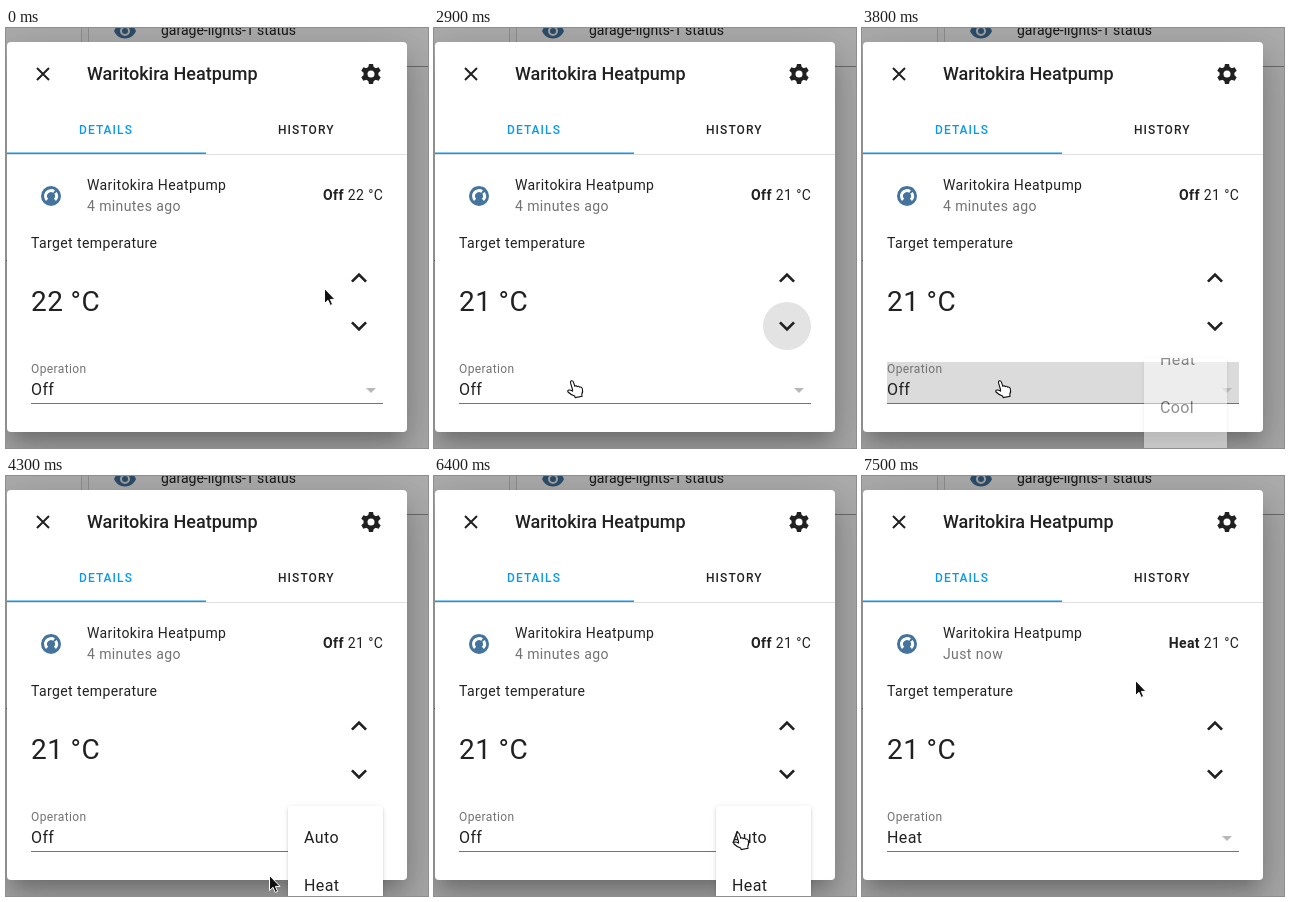
An HTML page for the animation above (8000 ms loop, 422 by 420 pixels).

```html
<!DOCTYPE html>
<html lang="en">
<head>
<meta charset="utf-8">
<title>Heatpump control</title>
<style>
  html, body { margin: 0; width: 100%; height: 100%; overflow: hidden; }
  body { position: relative; background: #aaa; font: 14px Roboto, sans-serif; letter-spacing: .4px; }
  svg, #dialog, #menu { position: absolute; }
  svg { left: 0; top: 0; width: 422px; height: 420px; fill: #212121; }
  #dialog {
    left: 1px; top: 14px; width: 400px; height: 390px; border-radius: 4px; background: #fff;
    box-shadow: 0 11px 15px -7px rgba(0,0,0,.2), 0 24px 38px 3px rgba(0,0,0,.14), 0 9px 46px 8px rgba(0,0,0,.12);
  }
  #menu {
    left: 282px; top: 330px; width: 95px; height: 208px; overflow: hidden; border-radius: 2px; background: #fff;
    box-shadow: 0 2px 2px rgba(0,0,0,.14), 0 1px 5px rgba(0,0,0,.12), 0 3px 1px -2px rgba(0,0,0,.2);
  }
  #items { padding: 8px 16px; font-size: 16px; line-height: 48px; color: #212121; }
  .plain { letter-spacing: 0; }
  .title { font-size: 18px; font-weight: 500; letter-spacing: 0; }
  .tab { font-size: 12px; font-weight: 500; letter-spacing: .0893em; }
  .muted { fill: #727272; }
  .label { font-size: 12px; }
  .value { font-size: 16px; }
  .big { font-size: 28px; }
</style>
</head>
<body>
<svg>
  <rect width="75" height="232" fill="#adadad"/>
  <rect x="82" width="340" height="38" fill="#adadad"/>
  <path d="M75.5 0V20M82.5 0V20" stroke="#909090"/>
  <path d="M0 232.5H3M400 38.5H422" stroke="#6b6b6b"/>
  <g transform="translate(107 -9)" fill="#2e4e6b">
    <path d="M12 4.5C7 4.5 2.7 7.6 1 12c1.7 4.4 6 7.5 11 7.5s9.3-3.1 11-7.5C21.3 7.6 17 4.5 12 4.5"/>
    <circle cx="12" cy="12" r="4" stroke="#a5a5a5" stroke-width="2"/>
  </g>
  <text class="plain" x="155" y="7" fill="#161616">garage-lights-1 status</text>
</svg>

<div id="dialog"></div>

<svg>
  <defs>
    <clipPath id="rowClip"><rect x="25" y="334" width="352" height="42"/></clipPath>
    <path id="tooth" d="M-2.9-6L-2-10H2L2.9-6Z"/>
  </defs>
  <path d="M31 40L43 52M43 40L31 52" stroke="#212121" stroke-width="2"/>
  <text class="title" x="81" y="52">Waritokira Heatpump</text>
  <g id="gear" transform="translate(365 46)">
    <circle r="5.5" fill="none" stroke="#212121" stroke-width="4"/>
  </g>

  <text class="tab" x="73" y="106" fill="#0b9ae9">DETAILS</text>
  <text class="tab" x="272" y="106">HISTORY</text>
  <rect x="1" y="126" width="400" height="1" fill="#e0e0e0"/>
  <rect x="1" y="124.5" width="199" height="1.5" fill="#0b9ae9"/>

  <g transform="translate(33 156)">
    <circle cx="12" cy="12" r="10" fill="#44739e"/>
    <path d="M8.1 15.9A5.5 5.5 0 0 1 15.1 7.5M16.5 8.9A5.5 5.5 0 0 1 15.9 15.9" fill="none" stroke="#fff" stroke-width="3"/>
  </g>
  <text x="81" y="162">Waritokira Heatpump</text>
  <text id="changed" class="muted" x="81" y="183"></text>
  <text x="377.4" y="172" text-anchor="end"><tspan id="mode" font-weight="700"></tspan> <tspan id="current"></tspan></text>

  <text x="25" y="220">Target temperature</text>
  <text id="target" class="big" x="25" y="283"></text>
  <circle id="buttonRipple" cx="353" cy="298" r="24"/>
  <path d="M-6.1 4.55L0-1.56L6.1 4.55L8 2.67L0-5.33L-8 2.67Z" transform="translate(353 250)"/>
  <path d="M-6.1-4.55L0 1.56L6.1-4.55L8-2.67L0 5.33L-8-2.67Z" transform="translate(353 298)"/>

  <circle id="rowRipple" cx="139" cy="355" clip-path="url(#rowClip)"/>
  <text class="label muted" x="25" y="345">Operation</text>
  <text id="operation" class="value" x="25" y="367"></text>
  <path d="M360 360H370L365 365Z" fill="#b8b8b8"/>
  <rect x="25" y="375" width="352" height="1" fill="#727272"/>
</svg>

<div id="menu"><div id="items">Auto<br>Heat<br>Cool<br>Off</div></div>

<svg>
  <path id="arrow" d="M.5.5V15.5L4 12.3L6.2 17.4L8.6 16.4L6.4 11.4H11Z" fill="#111" stroke="#fff"/>
  <path id="hand" d="M5.5 9.5L3.6 3.2Q3.2 1 4.6.8Q6 .6 6.6 2.6L7.8 6.2Q9.2 5.2 10.2 6.6Q11.8 5.6 12.7 7.2Q14.6 6.6 15.3 8.6Q16.2 11.5 14.8 14.2L15 16.3L8.2 17.6L7.6 16Q3.5 14.5 1 12Q.2 10.4 1.8 10Q3.6 9.9 5.5 11Z" fill="#fff" stroke="#111" stroke-width="1.1"/>
</svg>

<script>
  const LOOP = 8000, STEP = 100;
  const $ = id => document.getElementById(id);
  const clamp = v => Math.max(0, Math.min(1, v));
  const ramp = (t, start, length) => clamp((t - start) / length);

  // Pointer legs: start time, end time, end x, end y, pointer shape on arrival
  const legs = [
    [0, 0, 318, 260, 'arrow'],
    [0, 300, 367, 285, 'hand'],
    [300, 400, 356, 291, 'hand'],
    [800, 900, 357, 299, 'hand'],
    [1000, 1300, 200, 252, 'arrow'],
    [1600, 2000, 133, 352, 'hand'],
    [3900, 4200, 235, 400, 'arrow'],
    [4200, 4300, 263, 399, 'arrow'],
    [4300, 4400, 283, 380, 'hand'],
    [4400, 4500, 291, 380, 'hand'],
    [4600, 5000, 313, 395, 'hand'],
    [5600, 5800, 293, 333, 'hand'],
    [6300, 6400, 299, 356, 'hand'],
    [6400, 6700, 315, 401, 'hand'],
    [6700, 6800, 312, 401, 'hand'],
    [7100, 7500, 273, 204, 'arrow'],
  ];

  function pointerAt(t) {
    let [, , x, y, shape] = legs[0];
    for (const [start, end, toX, toY, toShape] of legs.slice(1)) {
      if (t <= start) break;
      const p = ramp(t, start, end - start);
      x += (toX - x) * p;
      y += (toY - y) * p;
      if (p === 1 || toShape === 'arrow') shape = toShape;
    }
    return { x: Math.round(x), y: Math.round(y), shape };
  }

  function render(t) {
    const chosen = t >= 7100, reported = t >= 7300;
    $('target').textContent = t < 900 ? '22 °C' : '21 °C';
    $('target').style.fill = t >= 900 && t < 2800 ? '#e60035' : '';
    $('current').textContent = t < 2900 ? '22 °C' : '21 °C';
    $('mode').textContent = reported ? 'Heat' : 'Off';
    $('changed').textContent = reported ? 'Just now' : '4 minutes ago';
    $('operation').textContent = chosen ? 'Heat' : 'Off';

    $('buttonRipple').style.opacity = t < 900 ? 0 : .125 * (1 - ramp(t, 3500, 300));
    $('rowRipple').setAttribute('r', 50 + 200 * ramp(t, 3600, 200));
    $('rowRipple').style.opacity = t < 3600 ? 0 : .16 * (1 - ramp(t, 3800, 400));

    const menu = $('menu').style;
    menu.opacity = ramp(t, 3700, 200) * (1 - ramp(t, 7000, 200));
    menu.width = 95 * (.5 + .5 * (1 - (1 - ramp(t, 3700, 150)) ** 1.26)) + 'px';
    $('items').style.transform = `translateY(${-122 * (1 - ramp(t, 3700, 275))}px)`;

    const { x, y, shape } = pointerAt(t);
    for (const id of ['arrow', 'hand']) {
      $(id).setAttribute('transform', `translate(${x} ${y})`);
      $(id).style.display = id === shape ? '' : 'none';
    }
  }

  for (let angle = 0; angle < 360; angle += 60) {
    const tooth = document.createElementNS('http://www.w3.org/2000/svg', 'use');
    tooth.setAttribute('href', '#tooth');
    tooth.setAttribute('transform', `rotate(${angle})`);
    $('gear').append(tooth);
  }

  const begin = performance.now();
  function frame() {
    const t = (performance.now() - begin) % LOOP;
    render(Math.floor(t / STEP) * STEP);
    requestAnimationFrame(frame);
  }
  frame();
</script>
</body>
</html>
```
